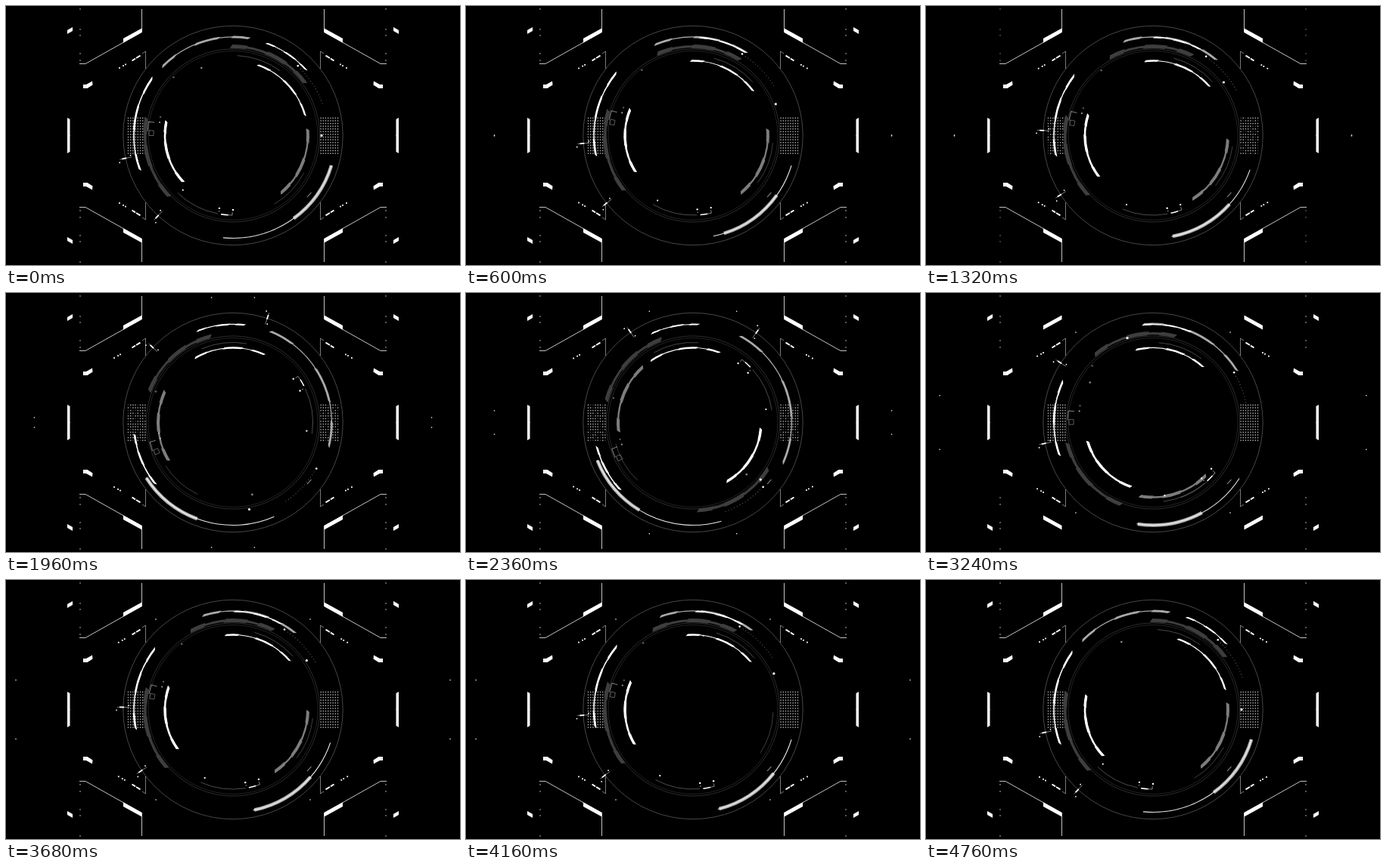
An HTML page with a canvas for the animation above (4800 ms loop, 600 by 343 pixels).

```html
<!DOCTYPE html>
<html lang="en">
<head>
<meta charset="utf-8">
<title>HUD ring</title>
<style>
  html, body { margin: 0; width: 100%; height: 100%; overflow: hidden; background: #000; }
  canvas { display: block; width: 600px; height: 343px; }
</style>
</head>
<body>
<canvas id="stage" width="600" height="343"></canvas>
<script>
const ctx = document.getElementById('stage').getContext('2d');
const LOOP = 4800, STEP = 40, RAD = Math.PI / 180;
let time = 0;

const white = a => `rgba(255,255,255,${a})`;
const between = (a, b) => time >= a && time < b;
const near = (moment, reach = 200) => Math.abs(time - moment) < reach;
const progress = (a, b) => Math.min(1, Math.max(0, (time - a) / (b - a)));
const easeOut = (a, b) => 1 - (1 - progress(a, b)) ** 3.3;
const smooth = (a, b) => { const u = progress(a, b); return u * u * (3 - 2 * u); };

// Every part goes from rest to a middle pose, swings far, and returns the same way.
function swing(rest, mid, far) {
  const toMid = easeOut(0, 1300) - easeOut(4160, 4760);
  const toFar = easeOut(1300, 2800) - easeOut(2800, 4160);
  return rest + (mid - rest) * toMid + (far - mid) * toFar;
}

function line(points, alpha, width = 1) {
  ctx.beginPath();
  points.forEach(([x, y]) => ctx.lineTo(x, y));
  ctx.strokeStyle = white(alpha);
  ctx.lineWidth = width;
  ctx.stroke();
}

function shape(points) {
  ctx.beginPath();
  points.forEach(([x, y]) => ctx.lineTo(x, y));
  ctx.fillStyle = '#fff';
  ctx.fill();
}

function box(x, y, size, alpha = 1) {
  ctx.fillStyle = white(alpha);
  ctx.fillRect(x - size / 2, y - size / 2, size, size);
}

function arc(r, from, to, alpha, width = 0.9) {
  ctx.beginPath();
  ctx.arc(0, 0, r, from * RAD, to * RAD);
  ctx.strokeStyle = white(alpha);
  ctx.lineWidth = width;
  ctx.stroke();
}

const polar = (r, angle) => [r * Math.cos(angle * RAD), r * Math.sin(angle * RAD)];

function dot(r, angle, size, alpha = 1) {
  ctx.beginPath();
  ctx.arc(...polar(r, angle), size, 0, 7);
  ctx.fillStyle = white(alpha);
  ctx.fill();
}

// Solid arc with slanted ends
function band(r, from, to, width, slant = 1.5) {
  ctx.beginPath();
  ctx.arc(0, 0, r + width / 2, (from + slant) * RAD, (to + slant) * RAD);
  ctx.arc(0, 0, r - width / 2, to * RAD, from * RAD, true);
  ctx.fill();
}

// Slim arc with heavier plates at both ends and past the middle
function platedArc(r, from, to, width, gray, base = 0.6) {
  const part = u => from + (to - from) * u;
  ctx.fillStyle = `rgb(${gray},${gray},${gray})`;
  band(r, from, to, width * base);
  band(r, from, part(0.18), width);
  band(r, part(0.42), part(0.68), width);
  band(r, part(0.82), to, width);
}

// One quarter of the frame, in top left coordinates
function corner() {
  if (!near(3280, 120)) line([[179.5, 4], [179.5, 34.5], [105, 76.5], [97, 76.5]], 0.85, 0.9);
  shape([[155, 43], [179.5, 29.5], [179.5, 35], [155, 48.5]]);
  if (!near(1340, 140)) shape([[81, 32], [88, 28], [88, 33], [81, 37]]);
  shape([[102, 104], [106, 104], [114, 99.5], [114.5, 104.5], [107.5, 109], [102, 109]]);
  shape([[81, 148], [84.5, 150], [84.5, 172], [81, 172]]);
  line([[180, 63], [184.5, 60], [184.5, 83]], 0.6, 0.8);
  line([[166.5, 72.5], [171, 69.7]], 1, 2);
  line([[172, 69], [177.5, 65.7]], 1, 2);
  const x = swing(150, 149, 142);
  [x, x + 5, x + 8].forEach(px => box(px, 82 - (px - 150) * 0.57, 1.8));
  [4, 31, 39, 63, 72].forEach(y => box(98, y, 1.3, near(1340, 340) ? 0.5 : 0.8));
}

function grid() {
  const busy = between(640, 3000);
  for (let col = 0; col < 8; col++) for (let row = 0; row < 14; row++) {
    const noise = Math.abs(Math.sin(col * 12.99 + row * 78.23 + Math.floor(time / 200) * 3.7) * 437.5) % 1;
    box(161.5 + col * 3.2, 148.4 + row * 3.6, 1.4, busy && noise < 0.3 ? 0.25 : 0.7);
  }
}

function driftingDots() {
  if (between(440, 4500)) {
    box(37.5 - 24.5 * smooth(2420, 3580), 171 - 38.5 * smooth(1400, 3640), 1.4, 0.9);
  }
  if (between(1720, 4500)) {
    const u = smooth(1720, 3100);
    box(278 - 80 * u, 2 + 50 * u, 1.4, 0.9);
  }
}

function mirrored(draw, vertical) {
  for (const sx of [1, -1]) for (const sy of vertical ? [1, -1] : [1]) {
    ctx.save();
    ctx.translate(300, 171.5);
    ctx.scale(sx, sy);
    ctx.translate(-300, -171.5);
    draw();
    ctx.restore();
  }
}

function rings() {
  arc(145.2, 0, 360, 0.31);
  arc(114.6, 0, 360, 0.22, 0.8);
  arc(112, 0, 360, 0.17, 0.8);
}

// Poses are the angles of the middle of each arc; gap is the moment it is switched off.
const SWEEPS = [
  { r: 118, poses: [295.6, 270, 220], width: 5, gray: 62, gap: 2800 },
  { r: 116.5, poses: [163, 169, 56.5], width: 5, gray: 62, gap: 1960 },
  { r: 99, poses: [22, 22, 203], width: 4, gray: 125, gap: 4160 },
  { r: 90, poses: [163.7, 176, 29.4], width: 3.4, gray: 255, base: 0.75, gap: 1960 },
  { r: 99, poses: [316.2, 292, 262], width: 2.4, gray: 255, base: 0.5 },
];

function platedArcs() {
  for (const { r, poses, width, gray, base, gap } of SWEEPS) {
    const mid = swing(...poses);
    if (!near(gap)) platedArc(r, mid - 27.5, mid + 27.5, width, gray, base);
  }
  platedArc(130.5, swing(223.6, 250, 298.8), swing(278.7, 305.6, 385), 2.8, 170, 0.45);
  const cap = swing(303.3, 285, 258);
  platedArc(130, cap - 14, cap + 14, 2, 255);
  if (!near(2800)) platedArc(131, swing(159, 169, 136), swing(214.7, 219, 164), 2.6, 255);
}

function heavyArc() {
  const mid = swing(35.4, 56.8, 141.3);
  ctx.fillStyle = '#b4b4b4';
  band(136, mid - 18.5, mid + 18.5, 4.5, 0);
  if (!near(2800)) arc(136, swing(17, 17, 75), swing(95.5, 76, 160), 0.9, 1.1);
}

function hairlines() {
  const a = swing(273, 287, 240), b = swing(28, 2, 136);
  if (!near(2800)) arc(106, a, a + 33, 0.3);
  arc(106, b, b + 31, 0.27);
}

function scanner() {
  const a = swing(95, 79, -50);
  arc(105.5, a + 6, a + 39, 0.33);
  dot(98, a + 37.5, 1.1);
  dot(98, a + 5.6, 1.2);
  dot(98.5, a - 5, 1.2);
  dot(102, a + 5.4, 0.8, 0.6);
  arc(105.5, a - 1.6, a + 3.7, 1, 1.5);
  line([polar(105.5, a - 1.6), polar(105.5, a - 4.5), polar(101.5, a - 4.5)], 0.5);
}

function bracket() {
  if (time >= 4640) return;
  const a = swing(185, 193.7, 157);
  line([polar(113, a - 2), polar(113, a + 4.3), polar(105, a + 4.5)], 0.5);
  line([polar(111, a - 5), polar(111, a - 1.5), polar(105, a - 1.5), polar(105, a - 5), polar(111, a - 5)], 0.35);
  dot(99, a + 9.3, 1.1, 0.4);
  dot(98.5, a + 5.2, 1.1, 0.6);
  dot(110, a + 39.5, 1.2, 0.4);
}

function orbiters() {
  const lead = swing(312.9, 299.3, 404.5);
  dot(126, lead, 1.3);
  for (let i = 0; i < 14; i++) dot(125.5, lead + 2.5 + i * 1.9, 0.55, 0.45);
  dot(117, swing(360, 336, 35), 1.6);
  dot(98.7, swing(245, 278, 40), 1.3, 0.55);
}

function pointer(a) {
  line([polar(137, a), polar(153, a)], 0.55, 0.9);
  line([polar(144, a), polar(150, a)], 1, 1.8);
  dot(154, a - 1.5, 0.9);
  dot(138, a + 1, 0.9);
}

function render() {
  time = Math.floor(performance.now() % LOOP / STEP) * STEP;
  ctx.fillStyle = '#000';
  ctx.fillRect(0, 0, 600, 343);
  mirrored(corner, true);
  mirrored(grid, false);
  mirrored(driftingDots, true);
  ctx.save();
  ctx.translate(300, 171.5);
  rings();
  platedArcs();
  heavyArc();
  hairlines();
  scanner();
  bracket();
  orbiters();
  pointer(swing(168, 177, 307.4));
  pointer(swing(133, 143.2, 237));
  line([[98, 81.5], [103.5, 75.5]], 0.6, 1.1);
  ctx.restore();
  requestAnimationFrame(render);
}
render();
</script>
</body>
</html>
```
